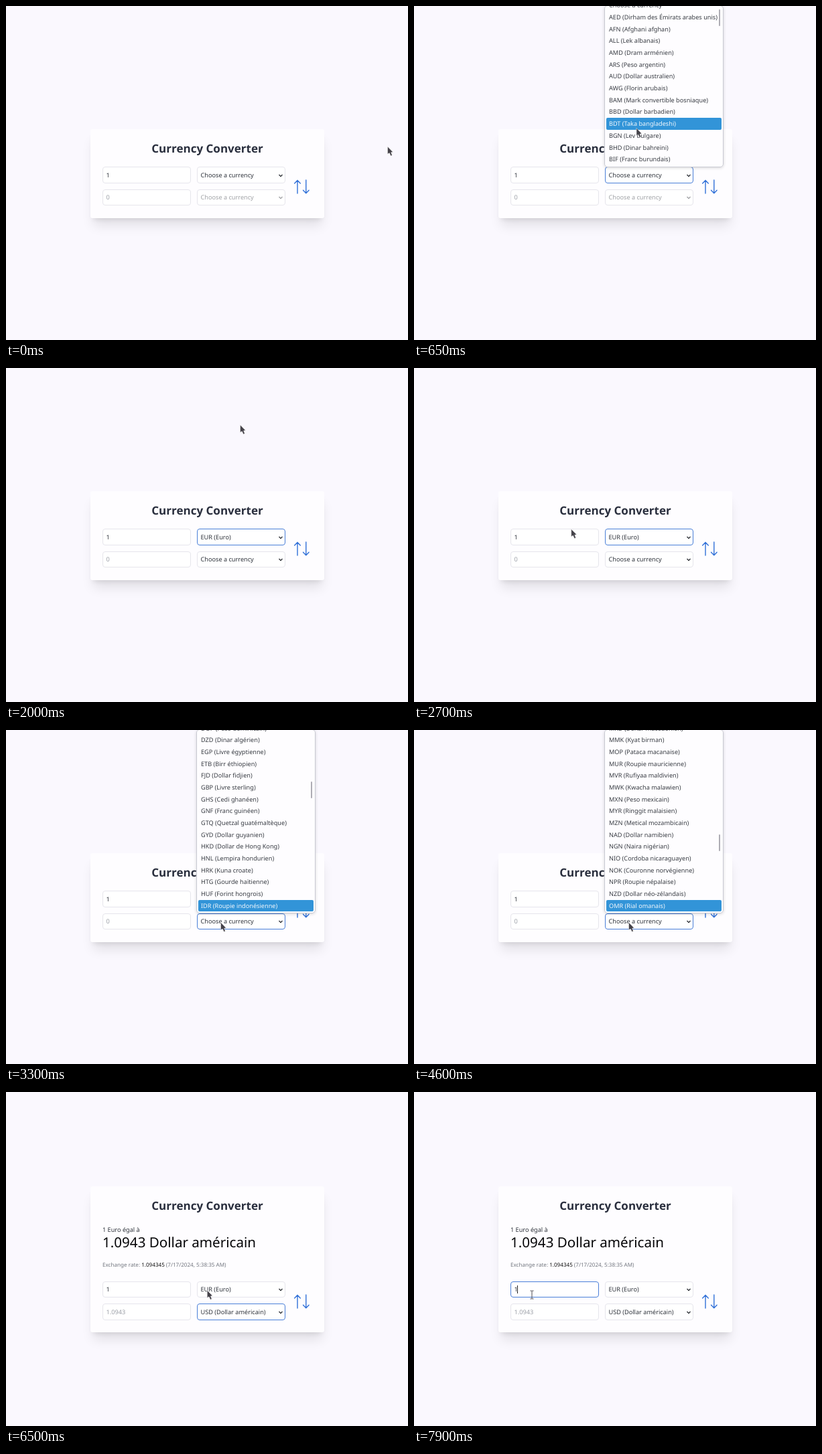
An HTML page that plays this animation: 600 px wide and 499 px high, repeating every 8 s.

```html
<!DOCTYPE html>
<html lang="en">
<head>
<meta charset="utf-8">
<title>Currency Converter</title>
<style>
html, body { margin: 0; width: 100%; height: 100%; overflow: hidden; background: #faf8fe; }
#stage { position: absolute; left: 0; top: 0; width: 600px; height: 499px; overflow: hidden;
  font: 9.16px/20px "Noto Sans", sans-serif; color: #2f343c; text-rendering: geometricPrecision; white-space: nowrap; cursor: none; }
#stage div, #stage svg { position: absolute; }
#card { left: 126px; width: 349px; background: #fefdff; border-radius: 3px;
  box-shadow: 0 14px 17px -3.5px rgba(0,0,0,.1), 0 5.5px 7px -4px rgba(0,0,0,.1); }
#title { left: 126px; width: 349px; text-align: center; font-size: 17.05px; font-weight: 700; color: #2a2f3e; }
#form, #result { left: 0; top: 0; width: 600px; }
.field { box-sizing: border-box; width: 131.7px; height: 24.6px; border: 1px solid #e6e5ec; border-radius: 4px; background: #fff; }
.field.focus { border-color: #4a7fd8; }
.field div { left: 4.5px; top: 1.8px; }
.field svg { right: 3px; top: 9.5px; }
.grey { color: #9b9fa7; }
svg { fill: none; overflow: visible; }
#big { left: 144px; top: 214.5px; font-size: 20.6px; color: #050507; }
#rate { left: 144px; top: 249px; font-size: 8.1px; color: #72767f; }
#rate b { font-weight: 500; color: #111; }
#popup { box-sizing: border-box; left: 284px; top: -1px; width: 178px; overflow: hidden; background: #fefdff;
  border: 1px solid #c9cad2; border-radius: 5px; }
#shade { left: 284px; top: -1px; width: 178px; border-radius: 5px; box-shadow: 0 1px 4px rgba(0,0,0,.16); }
#rows { left: 0; top: 0; }
#rows div { box-sizing: border-box; left: 2px; width: 171.5px; height: 17.67px; line-height: 17.67px;
  padding-left: 4px; border-radius: 2px; color: #383c43; }
#rows .on { background: #3294d8; color: #f4f8fc; }
#thumb { left: 170px; width: 2px; height: 25px; border-radius: 1px; background: #aeadb4; }
#caret { left: 154.3px; top: 289px; width: 1px; height: 12px; background: #222; }
</style>
</head>
<body>
<div id="stage">
  <div id="card"></div>
  <div id="title">Currency Converter</div>
  <div id="result">
    <div style="left:144px;top:195.5px">1 Euro égal à</div>
    <div id="big">1.0943 Dollar américain</div>
    <div id="rate">Exchange rate: <b>1.094345</b> (7/17/2024, 5:38:35 AM)</div>
  </div>
  <div id="form">
    <div class="field" id="amount" style="left:144px;top:240px"><div>1</div></div>
    <div class="field" id="from" style="left:285px;top:240px"><div></div><svg width="6" height="5"><path d="M.5 1 3 3.6 5.5 1" stroke="#26292f" stroke-width="1.3"/></svg></div>
    <div class="field" id="total" style="left:144px;top:273.6px"><div class="grey"></div></div>
    <div class="field" id="to" style="left:285px;top:273.6px"><div></div><svg width="6" height="5"><path d="M.5 1 3 3.6 5.5 1" stroke="#26292f" stroke-width="1.3"/></svg></div>
    <svg width="600" height="300" style="left:0;top:0;pointer-events:none" stroke="#3070d8" stroke-width="1.4" stroke-linecap="round" stroke-linejoin="round">
      <path d="M435 280V260.5M430.7 265l4.3-4.5 4.3 4.5M447.8 260V279.8M443.5 275.3l4.3 4.5 4.3-4.5"/>
    </svg>
  </div>
  <div id="shade"></div>
  <div id="popup"><div id="rows"></div><div id="thumb"></div></div>
  <div id="caret"></div>
  <svg id="arrow" width="10" height="16" style="left:0;top:0"><path d="M0 0V11.3L2.7 9.6 4.8 14 6.9 13 5.2 8.8 8 8.2Z" fill="#444249" stroke="#fff" stroke-width=".7" stroke-opacity=".7"/></svg>
  <svg id="beam" width="6" height="12" style="left:0;top:0"><path d="M-2.5-6H-.7L0-5.4.7-6H2.5M0-5.4V5.4M-2.5 6H-.7L0 5.4.7 6H2.5" stroke="#4a484f"/></svg>
</div>
<script>
const LOOP = 8000, STEP = 50, ROW = 17.67, CHOOSE = 'Choose a currency';
const $ = id => document.getElementById(id);

const names = `AED Dirham des Émirats arabes unis|AFN Afghani afghan|ALL Lek albanais|AMD Dram arménien|ARS Peso argentin|AUD Dollar australien|AWG Florin arubais|BAM Mark convertible bosniaque|BBD Dollar barbadien|BDT Taka bangladeshi|BGN Lev bulgare|BHD Dinar bahreïni|BIF Franc burundais|BMD Dollar bermudien|BND Dollar brunéien|BOB Boliviano bolivien|BRL Réal brésilien|BSD Dollar bahaméen|BTN Ngultrum bhoutanais|BWP Pula botswanais|BYN Rouble biélorusse|BZD Dollar bélizien|CAD Dollar canadien|CDF Franc congolais|CHF Franc suisse|CLP Peso chilien|CNY Yuan chinois|COP Peso colombien|CRC Colon costaricain|CUC Peso convertible|CUP Peso cubain|CVE Escudo cap-verdien|CZK Couronne tchèque|DJF Franc djiboutien|DKK Couronne danoise|DOP Peso dominicain|DZD Dinar algérien|EGP Livre égyptienne|ETB Birr éthiopien|EUR Euro|FJD Dollar fidjien|GBP Livre sterling|GHS Cedi ghanéen|GNF Franc guinéen|GTQ Quetzal guatémaltèque|GYD Dollar guyanien|HKD Dollar de Hong Kong|HNL Lempira hondurien|HRK Kuna croate|HTG Gourde haïtienne|HUF Forint hongrois|IDR Roupie indonésienne|ILS Shekel israélien|INR Roupie indienne|IQD Dinar irakien|IRR Rial iranien|ISK Couronne islandaise|JMD Dollar jamaïcain|JOD Dinar jordanien|JPY Yen japonais|KES Shilling kényan|KHR Riel cambodgien|KMF Franc comorien|KRW Won sud-coréen|KWD Dinar koweïtien|KYD Dollar caïmanais|KZT Tenge kazakh|LAK Kip laotien|LBP Livre libanaise|LKR Roupie srilankaise|LRD Dollar libérien|LSL Loti lesothan|LYD Dinar libyen|MAD Dirham marocain|MDL Leu moldave|MGA Ariary malgache|MKD Denar macédonien|MMK Kyat birman|MOP Pataca macanaise|MUR Roupie mauricienne|MVR Rufiyaa maldivien|MWK Kwacha malawien|MXN Peso mexicain|MYR Ringgit malaisien|MZN Metical mozambicain|NAD Dollar namibien|NGN Naira nigérian|NIO Cordoba nicaraguayen|NOK Couronne norvégienne|NPR Roupie népalaise|NZD Dollar néo-zélandais|OMR Rial omanais|PAB Balboa panaméen|PEN Sol péruvien|PGK Kina papouasien|PHP Peso philippin|PKR Roupie pakistanaise|PLN Zloty polonais|PYG Guarani paraguayen|QAR Riyal qatari|RON Leu roumain|RSD Dinar serbe|RUB Rouble russe|RWF Franc rwandais|SAR Riyal saoudien|SBD Dollar salomonais|SCR Roupie seychelloise|SDG Livre soudanaise|SEK Couronne suédoise|SGD Dollar de Singapour|SLL Leone sierra-léonais|SOS Shilling somalien|SVC Colon salvadorien|SZL Lilangeni swazi|THB Baht thaïlandais|TJS Somoni tadjik|TND Dinar tunisien|TRY Lira turque|TTD Dollar trinidadien|TWD Dollar taïwanais|TZS Shilling tanzanien|UAH Hryvnia ukrainienne|UGX Shilling ougandais|USD Dollar américain|UYU Peso uruguayen|UZS Sum ouzbek|VND Dong vietnamien|XAF Franc CFA (BEAC)|XCD Dollar des Caraïbes|XOF Franc CFA (BCEAO)|XPF Franc CFP|YER Rial yéménite|ZAR Rand sud-africain|ZMW Kwacha zambien`
  .split('|').map(s => `${s.slice(0, 3)} (${s.slice(4)})`);
const listFrom = [CHOOSE, ...names];
const listTo = listFrom.filter(s => !s.startsWith('EUR'));
const indexIn = (list, code) => list.findIndex(s => s.startsWith(code));

// Piecewise linear value from [time, value, ...] points.
function along(points, t) {
  if (t <= points[0][0]) return points[0].slice(1);
  for (let i = 1; i < points.length; i++) {
    const a = points[i - 1], b = points[i];
    if (t <= b[0]) {
      const k = (t - a[0]) / (b[0] - a[0]);
      return a.slice(1).map((v, j) => v + (b[j + 1] - v) * k);
    }
  }
  return points[points.length - 1].slice(1);
}

const pointer = [
  [0, 569.5, 210], [50, 520, 217], [100, 425, 233], [150, 345, 246], [200, 317, 250],
  [400, 317, 250], [550, 324, 225], [750, 340, 140], [900, 348, 96], [1000, 349.5, 85],
  [2250, 349.5, 85], [2400, 275, 126], [2550, 230, 186], [2650, 222, 225], [2800, 260, 272], [2950, 320.5, 287.5],
  [6450, 320.5, 287.5], [6550, 280, 305], [6650, 215, 310], [6750, 165, 302], [6800, 152, 299],
  [7150, 152, 299], [7300, 176, 303]
];
const eur = indexIn(listFrom, 'EUR') - 5;
const scrollFrom = [[1200, 0], [1400, eur * .62], [1500, eur * .88], [1600, eur]];
const start = indexIn(listTo, 'DZD'), end = indexIn(listTo, 'SEK');
const scrollTo = [[3250, 0], [3300, start], [3600, start + 25], [4400, start + 25], [4800, start + 54],
  [4950, start + 54], [5150, end - 4], [5350, end - 4], [5400, end], [5550, end], [5600, end + 1]];

let shown = null, rowEls = [];
function fill(list) {
  if (shown === list) return;
  shown = list;
  $('rows').replaceChildren(...rowEls = list.map((text, i) => {
    const el = document.createElement('div');
    el.textContent = text;
    el.style.top = i * ROW + 'px';
    return el;
  }));
}

function drawPopup(list, height, scroll, hot) {
  fill(list);
  $('popup').style.height = $('shade').style.height = height + 'px';
  $('rows').style.top = -0.7 - ROW / 2 - scroll * ROW + 'px';
  $('thumb').style.top = 3.8 + (scroll + .7) * 1.98 + 'px';
  rowEls.forEach((el, i) => el.classList.toggle('on', i === hot));
}

const show = (id, on) => $(id).style.visibility = on ? 'visible' : 'hidden';
const label = (id, text) => $(id).firstElementChild.textContent = text;

function render(t) {
  const [x, y] = along(pointer, t);
  const openFrom = t >= 400 && t < 1850, openTo = t >= 3050 && t < 6000, done = t >= 6000;

  $('card').style.top = (done ? 141 : 183.7) + 'px';
  $('card').style.height = (done ? 218 : 133) + 'px';
  $('title').style.top = (done ? 160 : 202.5) + 'px';
  $('form').style.top = (done ? 42.5 : 0) + 'px';
  show('result', done);

  label('from', t < 1850 ? CHOOSE : 'EUR (Euro)');
  label('to', done ? 'USD (Dollar américain)' : CHOOSE);
  label('total', done ? '1.0943' : '0');
  const [shade] = along([[1800, .45], [2000, 1]], t);
  for (const el of $('to').children) el.style.opacity = shade;

  const focus = t < 400 ? '' : t < 3050 ? 'from' : t < 6950 ? 'to' : 'amount';
  for (const id of ['amount', 'from', 'to']) $(id).classList.toggle('focus', id === focus);

  for (const id of ['popup', 'shade']) show(id, openFrom || openTo);
  if (openFrom) {
    const [scroll] = along(scrollFrom, t);
    drawPopup(listFrom, 242, scroll, y > 238 ? 0 : Math.round((y + .7) / ROW + scroll));
  } else if (openTo) {
    const top = Math.round(along(scrollTo, t)[0]);
    let hot = t < 3300 ? 0 : top + 14;
    if (t >= 5400 && t < 5500) hot--;
    drawPopup(listTo, 275, top - (t < 3300 ? .7 : .889), hot);
  }

  const overText = done && x > 144 && x < 276 && y > 283 && y < 307;
  show('arrow', !overText);
  show('beam', overText);
  $('arrow').style.transform = $('beam').style.transform = `translate(${x}px,${y}px)`;
  show('caret', t >= 7000 && (t < 7800 || t >= 7900));
}

const origin = performance.now();
function tick() {
  const t = (performance.now() - origin) % LOOP;
  render(Math.floor(t / STEP) * STEP);
  requestAnimationFrame(tick);
}
tick();
</script>
</body>
</html>
```
